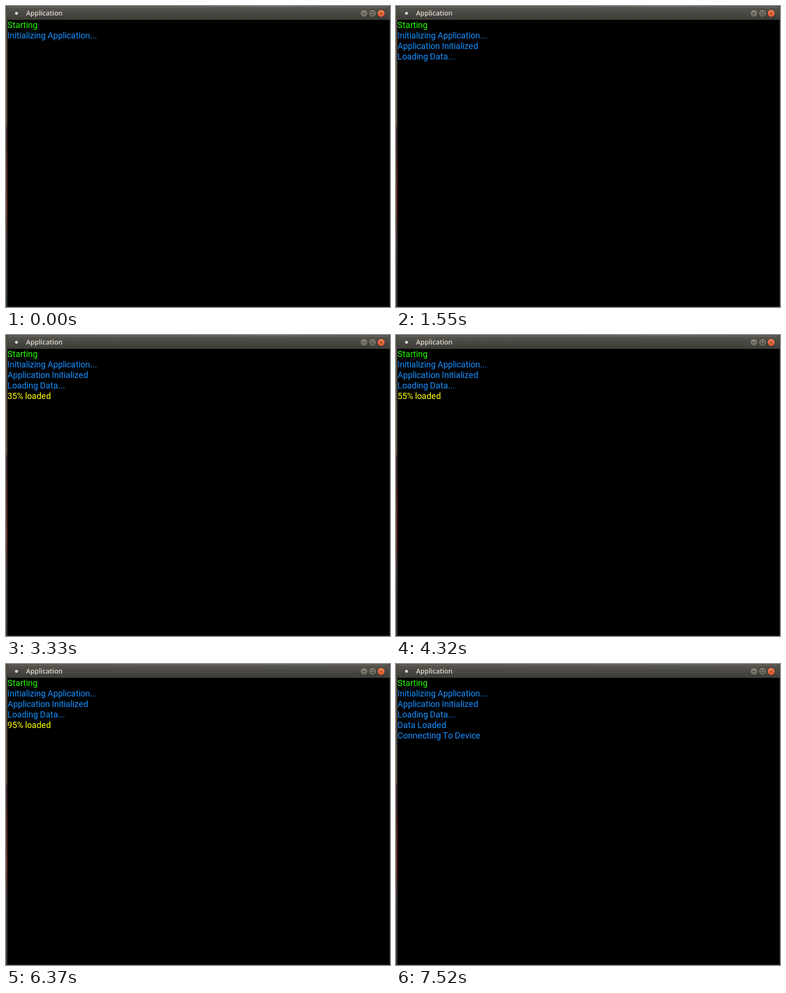
An HTML page that plays this animation: 804 by 630 pixels, repeating every 8 s.

```html
<!DOCTYPE html>
<html lang="en">
<head>
<meta charset="utf-8">
<title>Application</title>
<style>
  html, body { margin: 0; width: 804px; height: 630px; overflow: hidden; background: #000; }
  svg { display: block; }
  .log text { font: 18px Roboto, "Liberation Sans", sans-serif; white-space: pre; }
  .title { font: 600 14px "Open Sans", "Noto Sans", sans-serif; fill: #dfdbd2; }
</style>
</head>
<body>
<svg width="804" height="630" viewBox="0 0 804 630">
  <defs>
    <linearGradient id="bar" x2="0" y2="1">
      <stop offset="0" stop-color="#57564f"/>
      <stop offset=".5" stop-color="#494843"/>
      <stop offset="1" stop-color="#3d3c38"/>
    </linearGradient>
    <linearGradient id="desk" x2="0" y2="1">
      <stop offset="0" stop-color="#51473f"/>
      <stop offset=".39" stop-color="#594c3c"/>
      <stop offset=".41" stop-color="#40292a"/>
      <stop offset=".66" stop-color="#6c352a"/>
      <stop offset=".78" stop-color="#443a38"/>
      <stop offset="1" stop-color="#2c3a35"/>
    </linearGradient>
    <linearGradient id="edge">
      <stop offset="0" stop-color="#55483f"/>
      <stop offset=".4" stop-color="#6c504c"/>
      <stop offset=".7" stop-color="#77706c"/>
      <stop offset="1" stop-color="#554845"/>
    </linearGradient>
    <linearGradient id="grey" x2="0" y2="1">
      <stop offset="0" stop-color="#8b877e"/>
      <stop offset="1" stop-color="#69665e"/>
    </linearGradient>
    <linearGradient id="orange" x2="0" y2="1">
      <stop offset="0" stop-color="#f98558"/>
      <stop offset="1" stop-color="#e4552a"/>
    </linearGradient>
  </defs>

  <rect width="804" height="630" fill="url(#desk)"/>
  <rect width="804" height="8" fill="url(#edge)"/>
  <path d="M2 29V8Q2 1 9 1H796Q803 1 803 8V29Z" fill="url(#bar)"/>
  <path d="M7 2.5H798" stroke="#6c6b65"/>
  <rect x="3" y="29" width="800" height="600" fill="#000"/>
  <path d="M803.5 29V630M3 629.5H804" stroke="#2f2e2b" fill="none"/>

  <circle cx="22" cy="15.5" r="4.6" fill="#33322e"/>
  <circle cx="22" cy="15.2" r="3.3" fill="#d3d0c8"/>
  <text class="title" x="42" y="20">Application</text>

  <g stroke="#302f2b">
    <circle cx="749.5" cy="15.5" r="7.8" fill="url(#grey)"/>
    <circle cx="767.5" cy="15.5" r="7.8" fill="url(#grey)"/>
    <circle cx="785.5" cy="15.5" r="7.8" fill="url(#orange)"/>
    <path d="M746 15.5H753M764.5 12.5H770.5V18.5H764.5ZM783 13L788 18M788 13L783 18" fill="none"/>
  </g>

  <g class="log" id="log"></g>
</svg>
<script>
  const LOOP = 8000, LEFT = 3, LINE_HEIGHT = 22, FIRST_BASELINE = 46;
  const GREEN = '#22ff00', BLUE = '#1590ff', YELLOW = '#ffff00';

  // Each message is written to its row at the given time.
  const messages = [
    [0, 0, 'Starting', GREEN],
    [0, 1, 'Initializing Application...', BLUE],
    [560, 2, 'Application Initialized', BLUE],
    [1550, 3, 'Loading Data...', BLUE]
  ];
  const ticks = [1820, 2080, 2340, 2570, 2840, 3070, 3330, 3560, 3830, 4060,
    4320, 4590, 4820, 5120, 5350, 5610, 5840, 6110, 6370, 6600];
  ticks.forEach((time, i) => messages.push([time, 4, `${(i + 1) * 5}% loaded`, YELLOW]));
  messages.push([6670, 4, 'Data Loaded', BLUE], [7360, 5, 'Connecting To Device', BLUE]);

  const rows = Array.from({ length: 6 }, (_, i) => {
    const row = document.createElementNS('http://www.w3.org/2000/svg', 'text');
    row.setAttribute('y', FIRST_BASELINE + i * LINE_HEIGHT);
    return document.getElementById('log').appendChild(row);
  });

  const ruler = document.createElement('canvas').getContext('2d');
  ruler.font = '18px Roboto, "Liberation Sans", sans-serif';

  // The console advances by whole pixels, like a hinted font.
  function glyphPositions(text) {
    let x = LEFT;
    return [...text].map(char => {
      const start = x;
      x += Math.round(ruler.measureText(char).width);
      return start;
    }).join(' ');
  }

  function write(row, text, color) {
    if (row.textContent === text) return;
    row.textContent = text;
    row.setAttribute('x', glyphPositions(text));
    row.setAttribute('fill', color);
  }

  function render(time) {
    const shown = rows.map(() => ['', BLUE]);
    for (const [start, row, text, color] of messages) {
      if (time >= start) shown[row] = [text, color];
    }
    rows.forEach((row, i) => write(row, ...shown[i]));
  }

  const origin = performance.now();
  function frame() {
    render((performance.now() - origin) % LOOP);
    requestAnimationFrame(frame);
  }
  frame();
</script>
</body>
</html>
```
